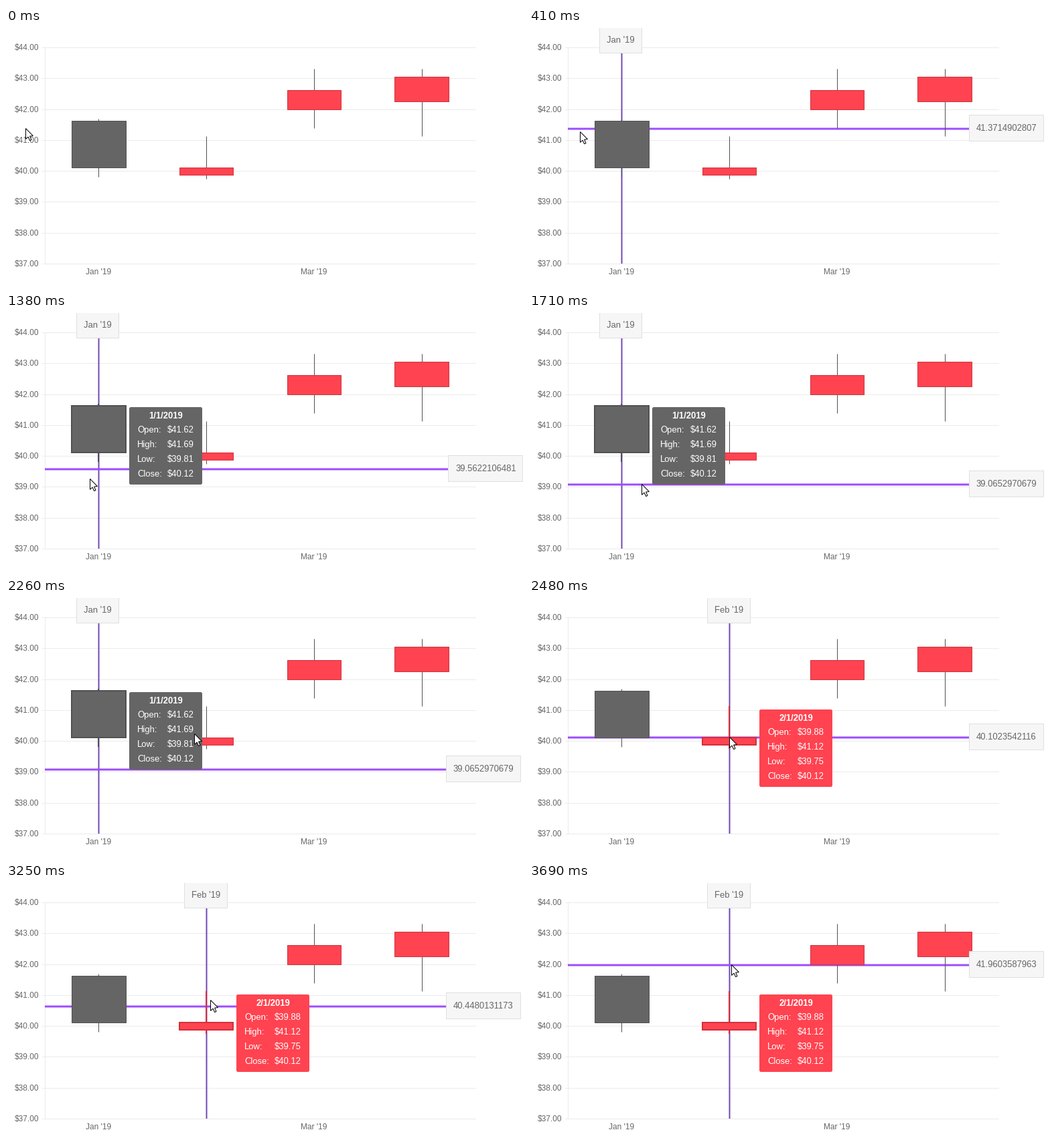
Recreate the animation shown at these times as a matplotlib script. Size 772 px wide and 385 px high, loop 4240 ms.

```python
import math

import matplotlib.pyplot as plt
import numpy as np
from matplotlib.animation import FuncAnimation
from matplotlib.patches import FancyBboxPatch, Polygon, Rectangle

W, H, DPI = 772, 385, 100
LOOP, TICK = 4240, 10
PX = 72 / DPI  # points per pixel

GRAY, RED = "#656565", "#ff4350"
GRID, WICK = "#ebebeb", "#515151"
H_LINE, V_LINE = "#9d4dff", "#7049b4"
BOX_FILL, BOX_EDGE = "#f6f6f6", "#dfdfdf"

LEFT, RIGHT, TOP, BOTTOM = 58.5, 701.5, 29.5, 353.5
SLOT = (RIGHT - LEFT) / 4

# open, high, low, close
PRICES = [
    (41.62, 41.69, 39.81, 40.12),
    (39.88, 41.12, 39.75, 40.12),
    (42.00, 43.30, 41.38, 42.62),
    (42.25, 43.30, 41.12, 43.06),
]

# the picture refreshes in short bursts: first ms, last ms, count
BURSTS = [(0, 0, 1), (100, 530, 5), (750, 1170, 5), (1290, 1380, 2),
          (1500, 1710, 3), (1830, 2260, 5), (2360, 2570, 3),
          (2810, 3250, 5), (3370, 3690, 4)]
STEPS = np.concatenate([np.linspace(*burst) for burst in BURSTS])

# time, x, y
POINTER = np.array([
    (0, 29, 151), (530, 108, 160), (960, 119, 195), (1380, 125, 249),
    (1710, 168, 257), (2150, 262, 197), (2260, 281, 204), (2570, 308, 211),
    (2810, 308, 206), (3250, 305, 176), (3690, 302, 123),
])

# time, line position, value in the label (the text trails the line)
LEVEL = np.array([
    (530, 151, 41.3714902807), (960, 185, 40.6856674383),
    (1380, 234, 39.5622106481), (1710, 257, 39.0652970679),
    (2360, 257, 39.0652970679), (2465, 209, 40.1023542116),
    (2810, 206, 40.1671489198), (3250, 185, 40.4480131173),
    (3690, 123, 41.9603587963),
])

CROSS_ON, TIP_ON, SWITCH = 200, 420, 2465

plt.rcParams["font.family"] = "Liberation Sans"
plt.rcParams["text.hinting"] = "native"
plt.rcParams["path.snap"] = False

fig = plt.figure(figsize=(W / DPI, H / DPI), dpi=DPI, facecolor="white")
ax = fig.add_axes([0, 0, 1, 1])
ax.set_xlim(0, W)
ax.set_ylim(H, 0)
ax.axis("off")


def line(x0, y0, x1, y1, color, width, z):
    return ax.plot([x0, x1], [y0, y1], color=color, lw=width * PX,
                   solid_capstyle="butt", zorder=z)[0]


def rect(x0, y0, x1, y1, fill, edge, width, z):
    return ax.add_patch(Rectangle((x0, y0), x1 - x0, y1 - y0, fc=fill, ec=edge,
                                  lw=width * PX, zorder=z))


def text(x, y, label, size, color=GRAY, z=1, **style):
    return ax.text(x, y, label, fontsize=size * PX, color=color, zorder=z,
                   va="baseline", parse_math=False, **style)


def price_y(price):
    return math.floor(TOP + (44 - price) * (BOTTOM - TOP) / 7)


def candle(i, fill, edge, wick, width, z):
    opened, high, low, closed = PRICES[i]
    shift = 0.5 if width == 1 else 0
    mid = LEFT + SLOT * (i + 0.5)
    x = math.floor(mid) + shift
    x0, x1 = (math.floor(mid + s * SLOT / 4) + shift for s in (-1, 1))
    y0 = price_y(max(opened, closed)) + shift
    y1 = price_y(min(opened, closed)) + shift
    return [line(x, price_y(high) + shift, x, price_y(low) + shift,
                 wick, width, z),
            rect(x0, y0, x1, y1, fill, edge, width, z + 0.1)]


def tooltip(x, y, title, prices, color):
    parts = [ax.add_patch(FancyBboxPatch(
        (x, y), 109, 116, boxstyle="round,pad=0,rounding_size=2.5",
        fc=color, ec="none", zorder=6))]
    parts.append(text(x + 54.5, y + 17, title, 13, "white", 6.1,
                      ha="center", weight="bold"))
    for row, (name, price) in enumerate(
            zip(("Open:", "High:", "Low:", "Close:"), prices)):
        base = y + 38 + 22 * row
        parts.append(text(x + 12, base, name, 13, "white", 6.1))
        parts.append(text(x + 57, base, f"${price:.2f}", 13, "white", 6.1))
    return parts


def category_cross(x, box_x, box_w, label):
    return [line(x, 29, x, 353, V_LINE, 2, 1.5),
            rect(box_x + 0.5, -1.5, box_x + box_w - 0.5, 37.5,
                 BOX_FILL, BOX_EDGE, 1, 5),
            text(box_x + 11, 22, label, 13, z=5.1)]


def show(parts, on):
    for part in parts:
        part.set_visible(on)


# axes and candles
for n in range(8):
    y = price_y(44 - n)
    line(54, y + 0.5, 702, y + 0.5, GRID, 1, 1)
    text(49, y + 4, f"${44 - n}.00", 12, ha="right")
line(58.5, 29, 58.5, 354, GRID, 1, 1)
text(138.5, 369, "Jan '19", 12, ha="center")
text(460, 369, "Mar '19", 12, ha="center")
for i in range(4):
    fill, edge = (GRAY, WICK) if i == 0 else (RED, "#cc3640")
    candle(i, fill, edge, WICK, 1, 2)

# hover parts for the first two months
crosses = [category_cross(138.5, 105, 64, "Jan '19"),
           category_cross(299.5, 266, 65, "Feb '19")]
hovers = [
    candle(0, GRAY, WICK, WICK, 2, 4)
    + tooltip(184, 141, "1/1/2019", PRICES[0], GRAY),
    candle(1, RED, "#d4303c", "#d4303c", 2, 4)
    + tooltip(344, 167, "2/1/2019", PRICES[1], RED),
]

# value crosshair, behind the candles
level_line = line(58, 0, 702, 0, H_LINE, 3, 1.6)
level_box = rect(657.5, 0, 768.5, 39, BOX_FILL, BOX_EDGE, 1, 5)
level_text = text(668, 0, "", 13, z=5.1)

ARROW = np.array([(0.5, -0.5), (0.5, 15.4), (4.1, 12.1), (6.6, 17.6),
                  (9.0, 16.6), (6.6, 11.1), (11.4, 10.6)])
pointer = ax.add_patch(Polygon(ARROW, closed=True, fc="white", ec="black",
                               lw=PX, zorder=8))


def track(t, keys):
    return [float(np.interp(t, keys[:, 0], keys[:, k])) for k in (1, 2)]


def update(frame):
    t = STEPS[STEPS <= frame * TICK].max()
    month = int(t >= SWITCH)
    for i in range(2):
        show(crosses[i], t >= CROSS_ON and i == month)
        show(hovers[i], t >= TIP_ON and i == month)

    y, value = track(t, LEVEL)
    y = round(y)
    label = f"{value:.10f}"
    x = 657 if y % 2 else 660  # the box jitters with the line's pixel row
    level_line.set_ydata([y, y])
    level_box.set_xy((x + 0.5, y - 20.5))
    level_text.set_position((x + 11, y + 3))
    level_text.set_text(label)
    show([level_line, level_box, level_text], t >= CROSS_ON)

    pointer.set_xy(ARROW + np.round(track(t, POINTER)))
    return []


anim = FuncAnimation(fig, update, frames=LOOP // TICK, interval=TICK,
                     init_func=lambda: update(0), repeat=True, repeat_delay=0,
                     blit=False)
plt.show()
```
